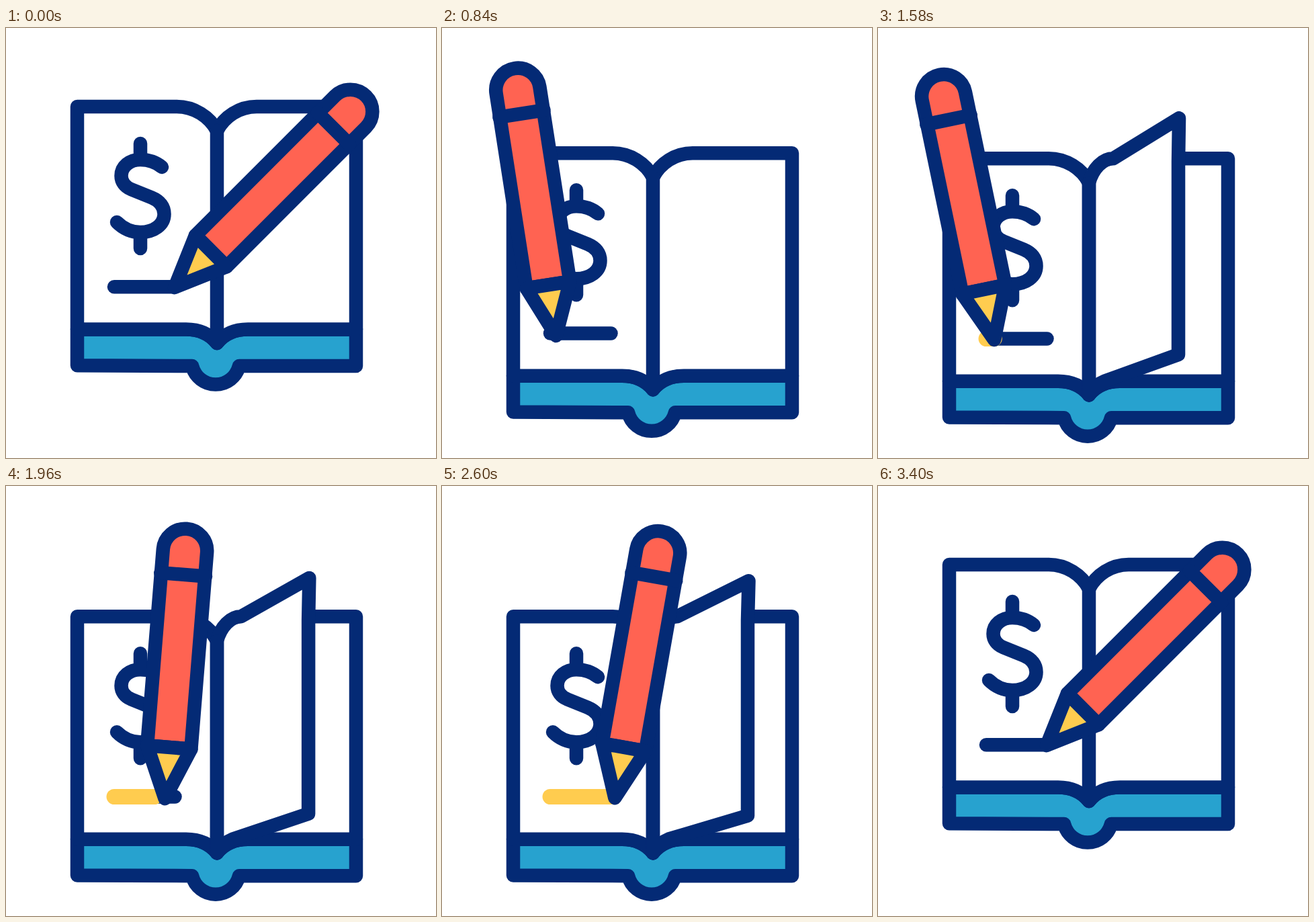
Write an HTML page that moves like this. It is 640 px wide and 640 px high and loops after 3620 ms.

```html
<!DOCTYPE html>
<html lang="en">
<head>
<meta charset="utf-8">
<title>Account book</title>
<style>
  html, body { margin: 0; height: 100%; overflow: hidden; background: #fff; }
  svg { display: block; width: 100vw; height: 100vh; }
  #scene { fill: none; stroke: #042a75; stroke-width: 20.5; stroke-linecap: round; stroke-linejoin: round; }
</style>
</head>
<body>
<svg viewBox="0 0 640 640">
  <g id="scene">
    <g id="book">
      <path fill="#27a2cf" d="M106 448.5H268C288 448.5 303 455 314 469C325 455 340 448.5 360 448.5H521V503H347A36 36 0 0 1 277 503L106 502.3Z"/>
      <path fill="#fff" d="M106 448.5V117H254C280 117 303 132 314 153C325 132 347 117 373 117H521V448.5H360C340 448.5 325 455 314 469C303 455 288 448.5 268 448.5Z"/>
      <path id="page" fill="#fff"/>
      <path d="M314 153V469"/>
      <path d="M200 172V196M200 304V328M232 207Q219 196 200 196C184 196 171.500 206 171.500 220C171.500 229 177 236 186 240L217 252.500C229 257.500 235.500 266 235.500 277C235.500 293 220 304 200 304Q180 304 165 289"/>
      <path d="M161 385.300H251.500"/>
      <path id="mark" stroke="#ffcc4f" stroke-width="23"/>
    </g>
    <g id="pencil">
      <path fill="#ff6352" d="M-32.750-76.500V-370A32.750 32.750 0 0 1 32.750-370V-76.500Z"/>
      <path fill="#ffcc4f" d="M-32.750-76.500H32.750L0 0Z"/>
      <path d="M-33.500-334.500H33.500"/>
    </g>
  </g>
</svg>
<script>
const LOOP = 3620;
const el = id => document.getElementById(id);
const book = el('book'), page = el('page'), mark = el('mark'), pencil = el('pencil');

// Eased progress of t between two times, 0 to 1
const ease = (t, from, to) => {
  const x = Math.min(1, Math.max(0, (t - from) / (to - from)));
  return x * x * (3 - 2 * x);
};
const mix = (a, b, p) => a + (b - a) * p;

// Pencil moves: start, end, [tip x, tip y, angle] at both ends, downward bow of the path
const rest = [251, 386.1, 45], lineStart = [160.5, 463.1, -15], lineEnd = [257.3, 464.2, 10];
const moves = [
  [200, 1000, rest, lineStart, 9],
  [1400, 2200, lineStart, lineEnd, 2],
  [2600, 3310, lineEnd, rest, 2.5]
];

function drawPencil(t) {
  const [from, to, a, b, bow] = moves.filter(m => t >= m[0]).pop() || moves[0];
  const p = ease(t, from, to);
  const [x, y, angle] = a.map((v, i) => mix(v, b[i], p));
  pencil.setAttribute('transform',
    `translate(${x} ${y + bow * Math.sin(Math.PI * p)}) rotate(${angle})`);
}

function drawPage(t) {
  const open = ease(t, 1220, 1600) - ease(t, 2600, 3000);
  const drift = ease(t, 1600, 2400);
  const m = (flat, lifted) => mix(flat, lifted, open);
  const top = m(373, 350), foot = m(360, 337);
  const edge = m(521, 446.5 + 8.5 * drift);
  const tipX = m(521, 447.5 + 9 * drift), tipY = m(117, 56.5 + 7.5 * drift);
  const low = m(448.5, 408.5 + 5 * drift);
  page.setAttribute('d', open <= 0 ? '' :
    `M314 153C${m(325, 320)} 132 ${m(347, 334)} 117 ${top} 117L${tipX} ${tipY}` +
    `L${edge} ${m(117, 122)}V${low}L${foot} 448.5C${m(340, 328)} ${m(448.5, 452)} ${m(325, 321)} ${m(455, 458)} 314 469Z`);
}

function drawMark(t) {
  const p = ease(t, 1350, 2350);
  mark.setAttribute('d', p > 0 ? `M161 385.3H${mix(161, 251.5, p)}` : '');
  mark.setAttribute('opacity', 1 - ease(t, 3000, 3400));
}

function frame() {
  const t = performance.now() % LOOP;
  const sink = 77.2 * (ease(t, 200, 1000) - ease(t, 2600, 3400));
  book.setAttribute('transform', `translate(0 ${sink})`);
  drawPage(t);
  drawMark(t);
  drawPencil(t);
  requestAnimationFrame(frame);
}
frame();
</script>
</body>
</html>
```
